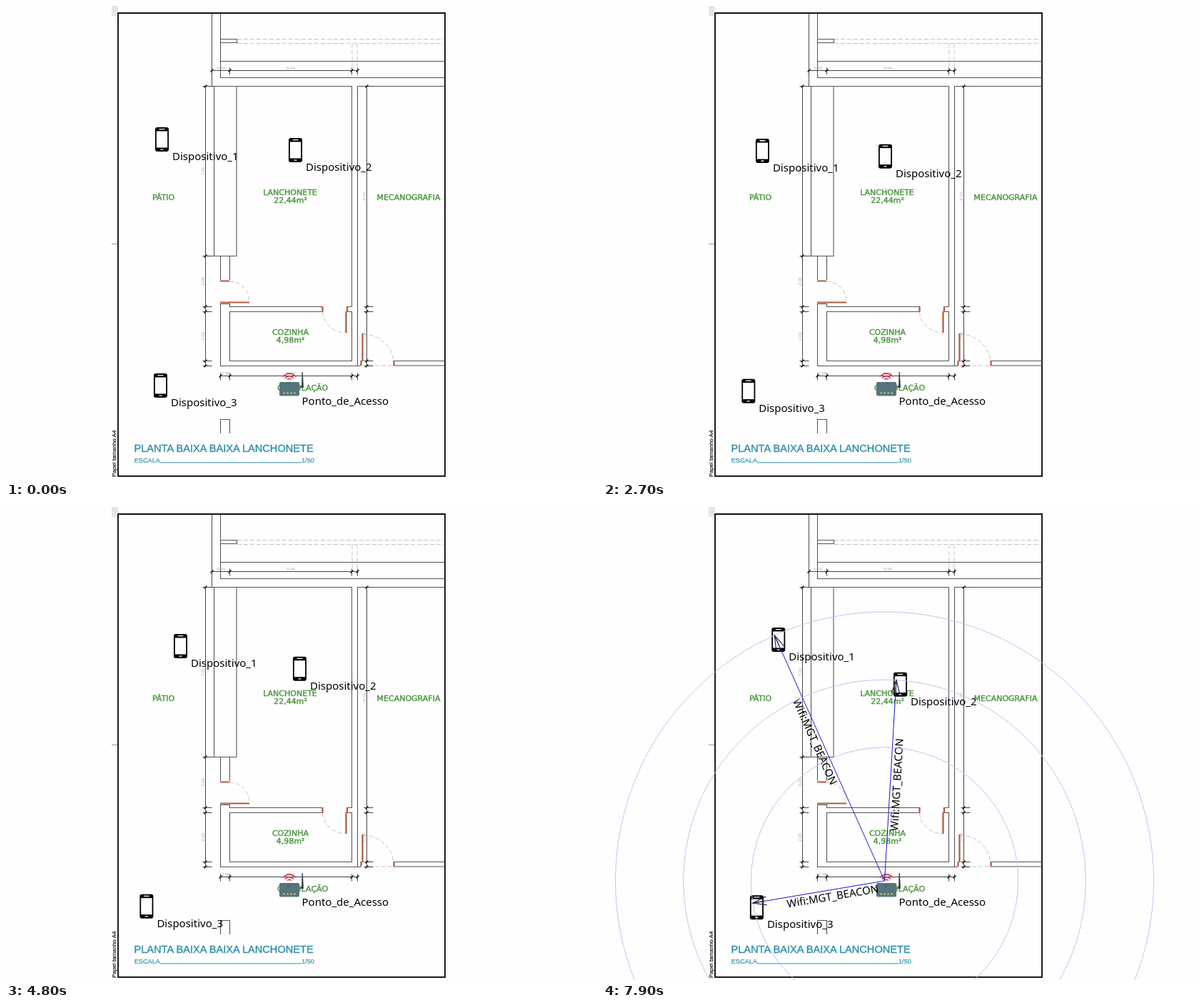
These frames come from a looping animation (828 by 663 pixels, 8 s). An HTML page:

```html
<!DOCTYPE html>
<html lang="pt">
<head>
<meta charset="utf-8">
<title>Planta baixa</title>
<style>
html, body { margin: 0; width: 100%; height: 100%; overflow: hidden; background: #fefefe; }
svg { display: block; }
path, line, circle { fill: none; }
.wall { stroke: #555; stroke-width: 1.1; }
.dim { stroke: #444; stroke-width: 1; }
.tick { stroke: #222; stroke-width: 1.6; }
.dash { stroke: #c4c4c4; stroke-dasharray: 6 3; }
.door { stroke: #b4583c; stroke-width: 2.2; }
.size { font: 6px "Liberation Sans", sans-serif; fill: #aaa; text-anchor: middle; }
.room { font: 11px "DejaVu Sans", sans-serif; fill: #4f9843; stroke: #4f9843; stroke-width: .45; text-anchor: middle; }
.title { font: 14.6px "Liberation Sans", sans-serif; fill: #2f90aa; stroke: #2f90aa; stroke-width: .4; }
.title .scale { font-size: 9.2px; stroke-width: .2; }
.name { font: 15px "Noto Sans", sans-serif; fill: #000; }
.wave { stroke: #c3c3f3; }
.ray { stroke: #1818cc; }
.head { stroke: #25254a; stroke-width: 1.2; }
.signal { stroke: #c8384e; stroke-width: 1.5; }
</style>
</head>
<body>
<svg width="828" height="663" viewBox="0 0 828 663">
  <defs>
    <g id="phone">
      <rect x="-9.5" y="-17" width="19" height="34" rx="3"/>
      <rect x="-7.7" y="-11.5" width="15.4" height="23" fill="#fefefe"/>
      <path d="M-4-14.3H4M-2 14.2H2" stroke="#fefefe" stroke-width="1.3"/>
    </g>
  </defs>

  <!-- sheet -->
  <rect x="148" width="9" height="14" fill="#e4e4e8"/>
  <path d="M157 8.5H616" stroke="#ccc"/>
  <path d="M148 333.5H157" stroke="#999"/>
  <rect x="157" y="10" width="458" height="649" fill="none" stroke="#1c1c1c" stroke-width="2"/>
  <text transform="translate(154 660) rotate(-90)" font-family="Liberation Sans, sans-serif" font-size="8" fill="#222" stroke="#222" stroke-width=".2">Papel tamanho A4</text>

  <!-- walls -->
  <g class="wall">
    <path d="M288.5 11V112M300.5 11V100.5H615M300 77.5H615M300.5 46.5H323.5V51.5H300.5"/>
    <path d="M279 112.5H484.5V422M492.5 504V112.5H615M291.5 112V350.5H323V112"/>
    <path d="M279 350.5H291M300.5 384V350.5H313.5V384"/>
    <path d="M497 504.5H300.5V417.5H313.5V421.5H443M478 421.5H484.5"/>
    <path d="M443 428.5H313.5V497.5H484.5V428.5H478"/>
    <path d="M615 497.5H543.5V504H615M300.5 599V579.5H313.5V599"/>
  </g>
  <g class="dash">
    <path d="M324 46.5H613M324 52.5H613M485 53V90M492 53V90M508 504H543"/>
    <path d="M313 386A28 28 0 0 1 341 415M443.5 429A33 31 0 0 0 476 458M500 460A43 43 0 0 1 543 497"/>
  </g>
  <path class="door" d="M300 385.5H313M300 415.5H341M443.5 421V429M478 421V429M476.5 428V458M499.5 459V498M497.5 497V504M543.5 497V504"/>
  <g id="dims"></g>

  <!-- room names -->
  <g class="room">
    <text x="220.5" y="272">PÁTIO</text>
    <text x="398" y="265">LANCHONETE</text>
    <text x="398.5" y="276">22,44m²</text>
    <text x="564" y="272">MECANOGRAFIA</text>
    <text x="398.5" y="461">COZINHA</text>
    <text x="398.5" y="472">4,98m²</text>
    <text x="415.5" y="539">CIRCULAÇÃO</text>
  </g>
  <g class="title">
    <text x="179.5" y="625">PLANTA BAIXA BAIXA LANCHONETE</text>
    <text class="scale" x="179.7" y="639.5">ESCALA</text>
    <text class="scale" x="414" y="639.5">1/50</text>
    <path d="M216 640H414" stroke-width="1"/>
  </g>

  <!-- access point -->
  <g id="router">
    <path d="M411 535L414 532L414.6 513H415.8L417 535Z" style="fill:#34444a"/>
    <rect x="383" y="527" width="28" height="19.5" rx="2" fill="#55757c"/>
    <path d="M393.5 530.5Q397 527.5 400.5 530.5M395.5 532.5H398.5" stroke="#456168"/>
    <path d="M388.5 542.5H406" stroke="#e6cf5a" stroke-width="2.2" stroke-dasharray="2.2 2.8"/>
    <text class="name" x="414.5" y="559">Ponto_de_Acesso</text>
  </g>

  <g id="devices"></g>
  <g id="beacon"></g>
</svg>
<script>
const LOOP = 8000;
const STRIDE = 11.3;
const METRES = 5.05 / 171.5; // per pixel
const AP = { x: 394.5, y: 524 };

// a beacon stays up until the next move
const moves = [1400, 1600, 2700, 3700, 4800, 5900, 6900, 7400];
const beacons = [700, 2100, 3600, 4300, 5400, 6400, 7900];

// random walks: equal strides, one heading in degrees per leg;
// early is the part of the first leg done at the first move
const walks = [
  { x: 218.5, y: 187, early: .5, headings: [31, 115, -21, -21, 207, 39, -77] },
  { x: 405.5, y: 202, early: 0, headings: [193, 85, 45, 45, 85, 10, 129] },
  { x: 216.5, y: 532, early: 0, headings: [100, 198, 129, 89, -31, -20, 99] }
];

const byId = id => document.getElementById(id);
function add(parent, tag, attrs = {}, text = '') {
  const el = document.createElementNS('http://www.w3.org/2000/svg', tag);
  for (const key in attrs) el.setAttribute(key, attrs[key]);
  el.textContent = text;
  return parent.appendChild(el);
}

// dimension line with slanted ticks; each wide gap shows its length
function dimension(vertical, at, ticks) {
  const g = byId('dims');
  const point = (a, b) => vertical ? `${b} ${a}` : `${a} ${b}`;
  const stroke = (name, a, b, c, d) => add(g, 'path', { class: name, d: `M${point(a, b)}L${point(c, d)}` });
  stroke('dim', ticks[0] - 1, at, ticks[ticks.length - 1] + 1, at);
  ticks.forEach((t, i) => {
    stroke('dim', t, at - 4, t, at + (vertical ? 9 : 6));
    stroke('tick', t - 2, at + 2, t + 2, at - 2);
    const gap = t - ticks[i - 1];
    if (!(gap > 10)) return;
    const turn = vertical ? ' rotate(-90)' : '';
    add(g, 'text', { class: 'size', transform: `translate(${point(t - gap / 2, at - 1.5)})${turn}` }, (gap * METRES).toFixed(2));
  });
}
const across = [300.5, 313.5, 484.5, 492.5];
const down = [112.5, 421.5, 428.5, 497.5, 504.5];
dimension(false, 90.5, [288.5, ...across.slice(1)]);
dimension(false, 518.5, across);
dimension(true, 279.5, [down[0], 350.5, ...down.slice(1)]);
dimension(true, 505.5, down);

for (let r = 3; r < 10; r += 3.2) {
  const y = 525.5 - r * .63;
  add(byId('router'), 'path', { class: 'signal', d: `M${AP.x + 2.5 - r} ${y}q${r} ${-r * .95} ${2 * r} 0` });
}

const devices = walks.map((walk, i) => {
  const g = add(byId('devices'), 'g');
  add(g, 'use', { href: '#phone' });
  add(g, 'text', { class: 'name', x: 14.5, y: 29 }, `Dispositivo_${i + 1}`);

  const b = byId('beacon');
  const wave = add(b, 'circle', { class: 'wave', cx: AP.x, cy: AP.y });
  const ray = add(b, 'line', { class: 'ray', x1: AP.x, y1: AP.y });
  const head = add(b, 'path', { class: 'head', d: 'M19-6L0 0L19 6M0 0H17' });
  const label = add(b, 'text', { class: 'name', y: 14.5 }, 'Wifi:MGT_BEACON');
  return { walk, g, wave, ray, head, label };
});

function position({ x, y, early, headings }, moved) {
  const legs = Math.max(moved - 1, moved * early);
  headings.forEach((deg, i) => {
    const dist = STRIDE * Math.min(1, Math.max(0, legs - i));
    x += dist * Math.cos(deg * Math.PI / 180);
    y += dist * Math.sin(deg * Math.PI / 180);
  });
  return { x, y };
}

function place(d, { x, y }) {
  d.g.setAttribute('transform', `translate(${x} ${y})`);
  const tip = { x: x - 5.5, y: y - 6 };
  const dx = AP.x - tip.x, dy = AP.y - tip.y;
  const len = Math.hypot(dx, dy);
  const angle = Math.atan2(dy, dx) * 180 / Math.PI;
  d.wave.setAttribute('r', len);
  d.ray.setAttribute('x2', tip.x);
  d.ray.setAttribute('y2', tip.y);
  d.head.setAttribute('transform', `translate(${tip.x} ${tip.y}) rotate(${angle})`);
  // text reads left to right, from a quarter of the ray
  const from = dx > 0 ? tip : AP;
  const turn = dx > 0 ? angle : angle + 180;
  d.label.setAttribute('x', len / 4);
  d.label.setAttribute('transform', `translate(${from.x} ${from.y}) rotate(${turn})`);
}

function draw(now) {
  const t = now % LOOP;
  const past = times => times.filter(time => time <= t);
  const moved = past(moves);
  devices.forEach(d => place(d, position(d.walk, moved.length)));
  const on = Math.max(0, ...past(beacons)) > Math.max(0, ...moved);
  byId('beacon').setAttribute('visibility', on ? 'visible' : 'hidden');
}
function tick() {
  draw(performance.now());
  requestAnimationFrame(tick);
}
tick();
</script>
</body>
</html>
```
